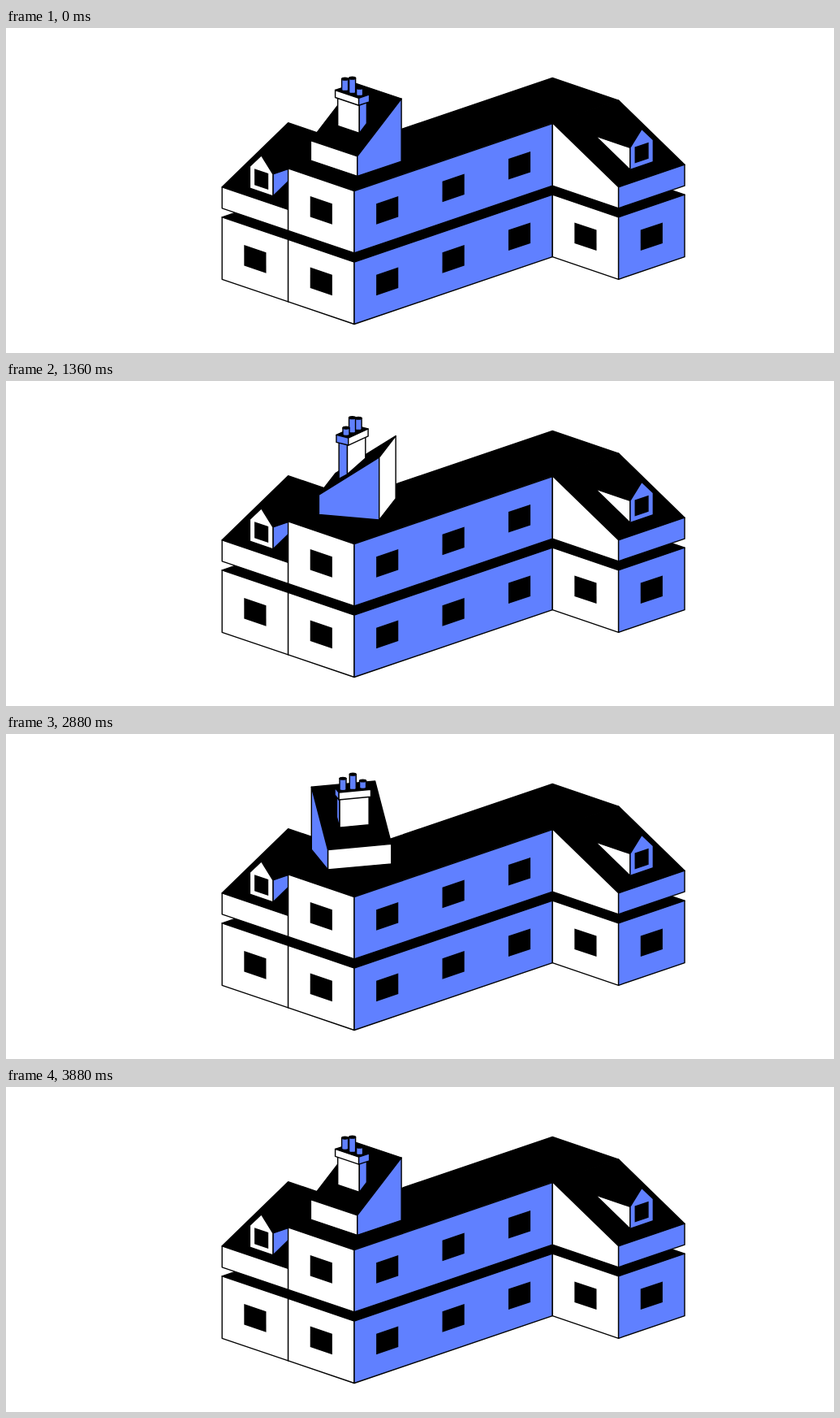
Recreate the animation shown at these times as an HTML page. Size 1020 by 400 pixels, loop 3.92 s.

```html
<!DOCTYPE html>
<html lang="en">
<head>
<meta charset="utf-8">
<title>House with a spinning roof block</title>
<style>
html, body { margin: 0; width: 100%; height: 100%; overflow: hidden; background: #fff; }
svg { display: block; width: 100%; height: 100%; }
polygon, path, ellipse { stroke: #000; stroke-width: 1.4; stroke-linejoin: round; }
.w { fill: #fff; }
.b { fill: #6080ff; }
.k { fill: #000; }
.win { stroke: none; }
</style>
</head>
<body>
<svg viewBox="0 0 1020 400">
  <g id="house"></g>
  <g id="block"></g>
</svg>
<script>
const LOOP = 3920, STEP = 40;
const poly = (cls, pts) =>
  `<polygon class="${cls}" points="${pts.map(p => p.map(n => n.toFixed(2)))}"/>`;

// ---- House: a runs up to the left, b up to the right, z is height ----
const STOREY = 76.5, FLOOR = 87.5, EAVE = 113.5, ROOF = 165;
const iso = (a, b, z) => [429 + 81.4 * (b - a), 364.5 - 27.6 * (a + b) - z];
const alongA = b => (s, z) => iso(s, b, z);
const alongB = a => (s, z) => iso(a, s, z);

const panel = (cls, at, s0, s1, z0, z1) =>
  poly(cls, [at(s0, z0), at(s1, z0), at(s1, z1), at(s0, z1)]);

// A wall with one window in the middle third of each unit
function wall(cls, at, s0, s1, z) {
  let out = panel(cls, at, s0, s1, z, z + STOREY);
  for (let s = s0; s < s1; s++)
    out += panel('k win', at, s + 1 / 3, s + 2 / 3, z + 26, z + 51.5);
  return out;
}

// at(s, depth, z): depth counts inwards from the eave
function dormer(front, side, at, mid, depth, inner) {
  const slope = (ROOF - EAVE), z = EAVE + slope * depth, top = z + 27;
  const l = mid - 0.175, r = mid + 0.175, face = (s, h) => at(s, depth, h);
  const flank = [face(inner, z), face(inner, top), at(inner, (top - EAVE) / slope, top)];
  return poly(side, flank) +
    poly(front, [face(l, z), face(l, top), face(mid, z + 45.3), face(r, top), face(r, z)]) +
    panel('k win', face, mid - 0.105, mid + 0.105, z + 6, z + 26);
}

function drawHouse() {
  const plan = [[2, 0], [0, 0], [0, 3], [-1, 3], [-1, 4], [1, 4], [1, 1], [2, 1]];
  const front = alongA(0), gable = alongA(3), long = alongB(0), end = alongB(-1);
  document.getElementById('house').innerHTML = [
    poly('k', plan.map(([a, b]) => iso(a, b, STOREY))),
    wall('w', front, 1, 2, 0),
    wall('w', front, 0, 1, 0),
    wall('b', long, 0, 3, 0),
    wall('w', gable, -1, 0, 0),
    wall('b', end, 3, 4, 0),
    // left wing
    poly('k', [iso(2, 0, EAVE), iso(2, 1, ROOF), iso(1, 1, ROOF), iso(1, 0, EAVE)]),
    dormer('w', 'b', (s, d, z) => iso(s, d, z), 1.5, 0.095, 1.325),
    panel('w', front, 1, 2, FLOOR, EAVE),
    // main body
    panel('k', (b, a) => iso(a, b, ROOF), 0, 4, 0, 1),
    wall('w', front, 0, 1, FLOOR),
    wall('b', long, 0, 3, FLOOR),
    // right wing
    poly('k', [iso(0, 3, ROOF), iso(0, 4, ROOF), iso(-1, 4, EAVE), iso(-1, 3, EAVE)]),
    poly('w', [gable(0, FLOOR), gable(0, ROOF), gable(-1, EAVE), gable(-1, FLOOR)]),
    panel('b', end, 3, 4, FLOOR, EAVE),
    dormer('b', 'w', (s, d, z) => iso(d - 1, s, z), 3.505, 0.155, 3.33)
  ].join('');
}

// ---- Spinning block ----
const AXIS = { x: 427.1, y: 165 }, TILT = 0.336, LIFT = 26.5;
const SPIN = 1330, RAMP = 344;
const rect = (u, v0, v1) => [[-u, v0], [u, v0], [u, v1], [-u, v1]];
const BASE = rect(28.7, -23, 31.3), STACK = rect(13.3, -5.1, 4), CAP = rect(14.5, -7, 6);
const POTS = [{ u: -9, z: 99.5 }, { u: 0, z: 103.5 }, { u: 9, z: 94.5 }];
const roofZ = v => 24.5 + 0.967 * (v + 23);

// In the first spin the chimney trails the body
const BODY = { turn: 365, lift: 325 }, CHIMNEY = { turn: 425, lift: 410 };
const TOGETHER = { turn: 2543, lift: 2566 };

// Constant speed with linear acceleration and braking
function turn(t) {
  if (t <= 0) return 0;
  if (t >= SPIN) return 1;
  const v = 1 / (SPIN - RAMP);
  if (t < RAMP) return v * t * t / (2 * RAMP);
  if (t > SPIN - RAMP) return 1 - v * (SPIN - t) ** 2 / (2 * RAMP);
  return v * (t - RAMP / 2);
}

function poseAt(start, t) {
  const a = 2 * Math.PI * turn(t - start.turn);
  const p = Math.min(1, Math.max(0, (t - start.lift) / SPIN));
  return { c: Math.cos(a), s: Math.sin(a), lift: LIFT * Math.sin(Math.PI * p) ** 2 };
}

const ground = (pose, [u, v]) => {
  const x = u + v, y = u - v;
  return [x * pose.c + y * pose.s, y * pose.c - x * pose.s];
};

const toV = (pose, [x, y]) =>
  (x * (pose.c - pose.s) - y * (pose.s + pose.c)) / 2;

const project = (pose, uv, z) => {
  const [x, y] = ground(pose, uv);
  return [AXIS.x + x, AXIS.y + TILT * y - z - pose.lift];
};

const facesUp = ([a, b, , d]) =>
  (b[0] - a[0]) * (d[1] - a[1]) - (b[1] - a[1]) * (d[0] - a[0]) < 0;

function prism(pose, base, low, high) {
  const lo = base.map(p => project(pose, p, low(p)));
  const hi = base.map(p => project(pose, p, high(p)));
  const up = facesUp(hi);
  let out = up ? poly('k', hi) : '';
  for (let i = 0; i < 4; i++) {
    const j = (i + 1) % 4;
    if (lo[j][0] > lo[i][0]) out += poly(i % 2 ? 'b' : 'w', [hi[i], hi[j], lo[j], lo[i]]);
  }
  return { out, up };
}

function pot(pose, { u, z }) {
  const [x, y] = project(pose, [u, -0.5], z), foot = y + z - 86;
  const r = 4, ry = r * TILT;
  return `<path class="b" d="M${x - r} ${y}V${foot}A${r} ${ry} 0 0 0 ${x + r} ${foot}V${y}Z"/>` +
    `<ellipse class="k" cx="${x}" cy="${y}" rx="${r}" ry="${ry}"/>`;
}

function drawBlock(t) {
  const first = t < 2200;
  const body = poseAt(first ? BODY : TOGETHER, t);
  const top = poseAt(first ? CHIMNEY : TOGETHER, t);
  const block = prism(body, BASE, () => 0, p => roofZ(p[1]));
  // the stack is cut off where it meets the sloping roof
  const foot = p => roofZ(toV(body, ground(top, p))) + body.lift - top.lift;
  const depth = p => ground(top, [p.u, -0.5])[1];
  const chimney = prism(top, STACK, foot, () => 77).out +
    prism(top, CAP, () => 77, () => 86).out +
    [...POTS].sort((a, b) => depth(a) - depth(b)).map(p => pot(top, p)).join('');
  document.getElementById('block').innerHTML =
    block.up ? block.out + chimney : chimney + block.out;
}

function tick() {
  const t = performance.now() % LOOP;
  drawBlock(Math.floor(t / STEP) * STEP);
  requestAnimationFrame(tick);
}

drawHouse();
tick();
</script>
</body>
</html>
```
